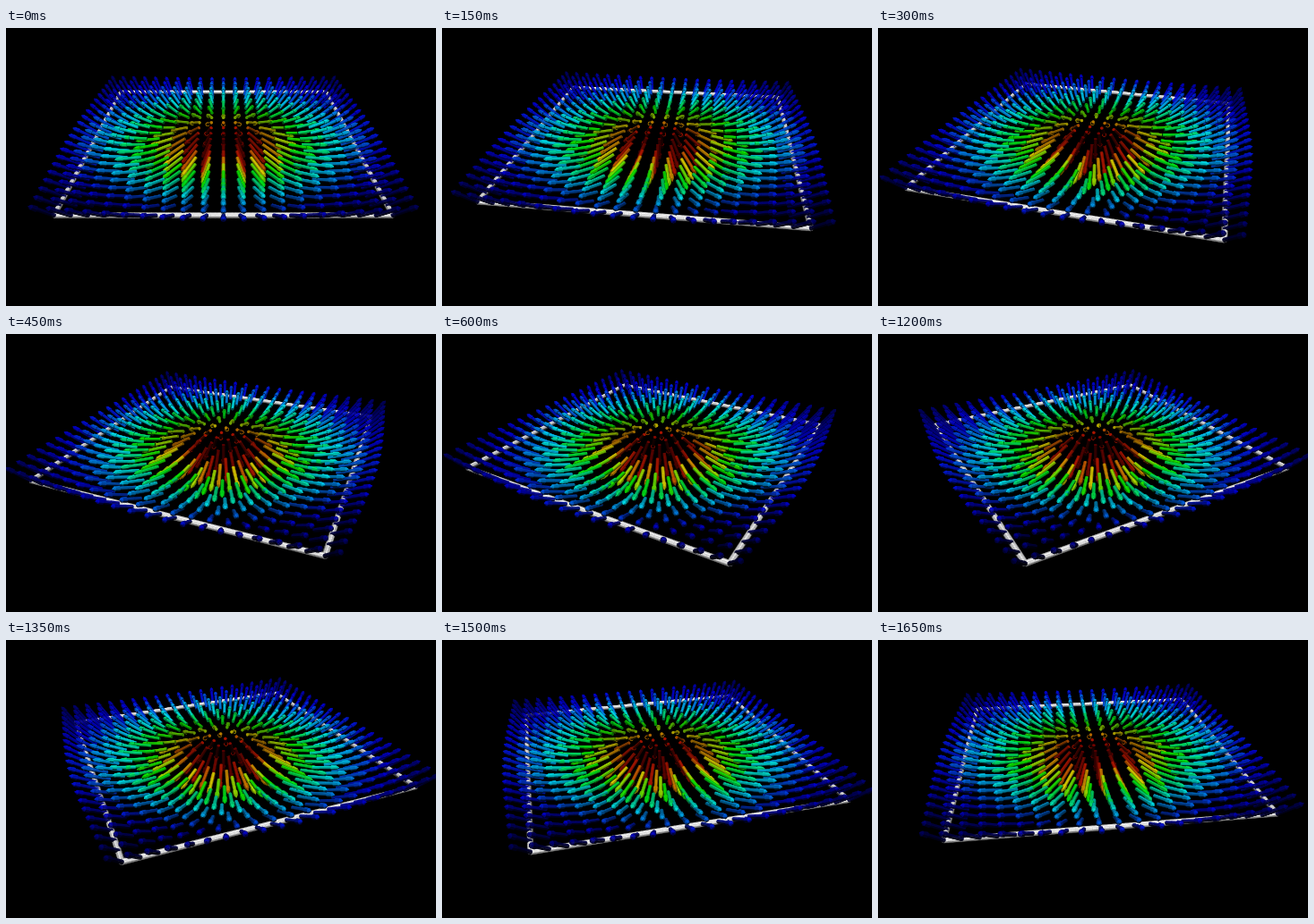
These frames come from a looping animation (480x311 px, 1.8 s). A matplotlib script:

```python
import numpy as np
import matplotlib.pyplot as plt
from matplotlib.animation import FuncAnimation
from matplotlib.collections import PolyCollection
from matplotlib.colors import LinearSegmentedColormap

W, H, DPI = 480, 311, 100
FRAMES, INTERVAL = 12, 150

# Camera: looks at the centre of the plate from above
SIN_E = 0.455
COS_E = np.sqrt(1 - SIN_E ** 2)
DIST, FOCAL = 3.647, 519.6
CX, CY = 242.7, 124.0
EYE = DIST * np.array([0, COS_E, SIN_E])
LIGHT = np.array([0, 0.55, 0.835])

# Dipole field sampled on a plane below the dipole
HEIGHT = 0.4
GRID = 21
ARROW = [(0, 0), (0, 0.0115), (0.07, 0.0115), (0.137, 0.0115),
         (0.137, 0.0175), (0.172, 0.0145), (0.19, 0)]
ROD_RADIUS = 0.017

RAMP = LinearSegmentedColormap.from_list("ramp", [
    (0.00, (0, 0, 0.40)), (0.20, (0, 0, 0.88)), (0.41, (0, 0.92, 1)),
    (0.60, (0, 0.95, 0)), (0.75, (0.88, 0.85, 0)), (0.88, (0.75, 0.10, 0)),
    (1.00, (0.40, 0, 0))])


def revolve(base, axis, u, v, profile, sides):
    """Quads and normals of a profile (along, radius) turned around an axis."""
    base, axis, u, v = (a[:, None, :] for a in (base, axis, u, v))
    step = 2 * np.pi / sides
    t = np.arange(sides)[:, None] * step

    def ring(angle):
        return np.cos(angle) * u + np.sin(angle) * v

    left, right, mid = ring(t), ring(t + step), ring(t + step / 2)
    quads, normals = [], []
    for (a0, r0), (a1, r1) in zip(profile[:-1], profile[1:]):
        size = np.hypot(a1 - a0, r1 - r0)
        n_axis, n_out = (r0 - r1) / size, (a1 - a0) / size
        start, end = base + a0 * axis, base + a1 * axis
        quads.append(np.stack([start + r0 * left, start + r0 * right,
                               end + r1 * right, end + r1 * left], axis=2))
        normals.append(n_axis * axis + n_out * mid)
    return np.concatenate(quads, axis=1), np.concatenate(normals, axis=1)


def build_arrows():
    side = np.linspace(-1, 1, GRID)
    x, y = (g.ravel() for g in np.meshgrid(side, side))
    r, phi = np.hypot(x, y), np.arctan2(y, x)
    b_r, b_z = 3 * HEIGHT * r, r ** 2 - 2 * HEIGHT ** 2
    size = np.hypot(b_r, b_z)
    zero = np.zeros_like(r)
    axis = np.stack([b_r * np.cos(phi), b_r * np.sin(phi), b_z], 1) / size[:, None]
    u = np.stack([-np.sin(phi), np.cos(phi), zero], 1)
    quads, normals = revolve(np.stack([x, y, zero], 1), axis, u,
                             np.cross(axis, u), ARROW, 8)
    level = np.log(size / (r ** 2 + HEIGHT ** 2) ** 2.5)
    level = (level - level.min()) / np.ptp(level)
    return quads, normals, RAMP(level)[:, :3]


def build_frame():
    base = np.array([[-1, -1, 0], [1, -1, 0], [1, 1, 0], [-1, 1, 0]], float)
    axis = np.array([[1, 0, 0], [0, 1, 0], [-1, 0, 0], [0, -1, 0]], float)
    u = np.tile([0.0, 0.0, 1.0], (4, 1))
    along = np.linspace(0, 2, 81)
    profile = [(0, 0)] + [(a, ROD_RADIUS) for a in along] + [(2, 0)]
    quads, normals = revolve(base, axis, u, np.cross(axis, u), profile, 10)
    return quads, normals, np.ones((4, 3))


def merge(*parts):
    quads = np.concatenate([q.reshape(-1, 4, 3) for q, n, c in parts])
    normals = np.concatenate([n.reshape(-1, 3) for q, n, c in parts])
    colors = np.concatenate([np.repeat(c, q.shape[1], axis=0) for q, n, c in parts])
    return quads, normals, colors


QUADS, NORMALS, COLORS = merge(build_arrows(), build_frame())


def turn(points, angle):
    c, s = np.cos(angle), np.sin(angle)
    x, y, z = np.moveaxis(points, -1, 0)
    return np.stack([c * x - s * y, s * x + c * y, z], axis=-1)


def to_camera(points):
    """Right, up and towards-the-viewer components."""
    x, y, z = np.moveaxis(points, -1, 0)
    return x, z * COS_E - y * SIN_E, y * COS_E + z * SIN_E


def render(angle):
    quads, normals = turn(QUADS, angle), turn(NORMALS, angle)
    centers = quads.mean(axis=1)
    seen = ((EYE - centers) * normals).sum(axis=1) > 0
    quads, normals, colors = quads[seen], normals[seen], COLORS[seen]

    x, up, near = to_camera(quads)
    scale = FOCAL / (DIST - near)
    verts = np.stack([CX + x * scale, CY - up * scale], axis=-1)

    lit = np.stack(to_camera(normals), axis=-1) @ LIGHT
    shade = 0.08 + 0.92 * np.clip(lit, 0, 1)
    order = np.argsort(near.mean(axis=1))
    return verts[order], np.clip(colors * shade[:, None], 0, 1)[order]


fig = plt.figure(figsize=(W / DPI, H / DPI), dpi=DPI, facecolor="black")
ax = fig.add_axes([0, 0, 1, 1])
ax.set_xlim(0, W)
ax.set_ylim(H, 0)
ax.axis("off")
mesh = PolyCollection([], linewidths=0.25, edgecolors="face")
ax.add_collection(mesh, autolim=False)


def update(i):
    verts, colors = render(i / FRAMES * np.pi / 2)
    mesh.set_verts(verts)
    mesh.set_facecolor(colors)
    return (mesh,)


anim = FuncAnimation(fig, update, frames=FRAMES, interval=INTERVAL,
                     repeat=True, repeat_delay=0, blit=False)
plt.show()
```
